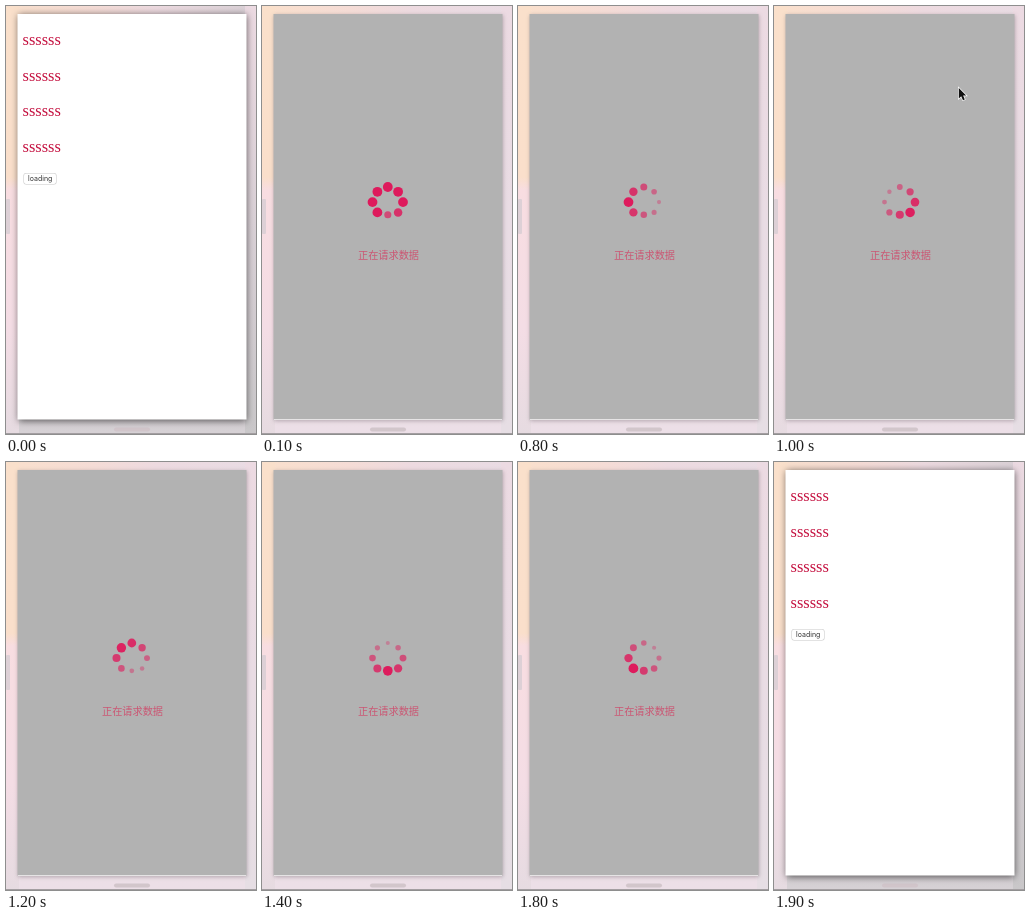
These frames come from a looping animation (250 by 428 pixels, 2000 ms). An HTML page with a canvas:

```html
<!DOCTYPE html>
<html lang="zh">
<head>
<meta charset="utf-8">
<style>
  html, body { margin: 0; width: 100%; height: 100%; overflow: hidden; }
  canvas { display: block; width: 250px; height: 428px; }
</style>
</head>
<body>
<canvas id="stage"></canvas>
<script>
const W = 250, H = 428, LOOP = 2000, STEP = 100;
const PANEL = [11.5, 8, 229, 405.5];
const canvas = document.getElementById('stage');
const ratio = window.devicePixelRatio || 1;
canvas.width = W * ratio;
canvas.height = H * ratio;
const ctx = canvas.getContext('2d');
ctx.scale(ratio, ratio);

// Dot offsets from the spinner centre, counter-clockwise from the bottom.
const DOTS = [[0, 13], [10.3, 10.6], [15.2, 0.3], [10.3, -10],
              [0, -14.8], [-10.4, -10], [-15.3, 0.3], [-10.4, 10.6]];

function box(fill, x, y, w, h, radius = 0) {
  ctx.fillStyle = fill;
  ctx.beginPath();
  ctx.roundRect(x, y, w, h, radius);
  ctx.fill();
}

function gradient(x1, y1, ...stops) {
  const g = ctx.createLinearGradient(0, 0, x1, y1);
  stops.forEach(([at, color]) => g.addColorStop(at, color));
  return g;
}

function text(string, font, color, x, y, align = 'left') {
  ctx.font = font;
  ctx.fillStyle = color;
  ctx.textAlign = align;
  ctx.fillText(string, x, y);
}

function drawBackdrop(loading) {
  const right = loading ? '#e9dce4' : '#d9d0d6';
  box(gradient(0, H, [0, '#f0dce2'], [1, loading ? '#ecdfe7' : '#d6d1d5']), 0, 0, W, H);
  box(gradient(W, 0, [0, '#fae0cc'], [0.35, '#f5dcd6'], [0.6, '#eddae0'], [1, right]), 0, 0, W, 10);
  box(gradient(0, H, [0, '#fae0cb'], [0.4, '#fadfcb'], [0.43, '#f8dde1'], [0.75, '#f4dde5'], [1, '#e6dbe1']), 0, 0, 13, H);
  box(gradient(0, H, [0, '#ecdae2'], [0.5, right], [1, loading ? '#e6dee4' : '#c9c7c9']), 239, 0, 11, H);
  box('#ddd0d6', 0, 193, 4, 35, 1);
  box('#d2c6cb', 108, 421.5, 36, 4, 2);
  box('#a39ea1', 0, 427, W, 1);
}

function drawPanel(loading) {
  ctx.save();
  ctx.shadowColor = loading ? 'rgba(90,80,85,.4)' : 'rgba(0,0,0,.6)';
  ctx.shadowBlur = (loading ? 4 : 7) * ratio;
  ctx.shadowOffsetY = ratio;
  box(loading ? '#b2b2b2' : '#fff', ...PANEL);
  ctx.restore();
  if (loading) box('#e6e4e5', 12, 413, 228, 1);
}

function drawPage() {
  for (let i = 0; i < 4; i++) {
    text('ssssss', '16.4px "Liberation Serif", serif', '#c4103f', 16.5, 39 + i * 35.5);
  }
  box('#c6c6c6', 17.5, 167, 33, 11.5, 2.5);
  box('#fff', 18, 167.4, 32, 10.5, 2);
  text('loading', '7px Inter, sans-serif', '#333', 34.2, 175.3, 'center');
}

function drawSpinner(step) {
  const seconds = 0.23 + 0.2125 * (step - 1);
  ctx.fillStyle = '#de1a5c';
  DOTS.forEach(([x, y], i) => {
    const phase = Math.max(0, seconds - 0.12 * i) % 1;
    const fade = 1 - Math.abs(1 - 2 * phase);
    ctx.globalAlpha = 1 - 0.7 * fade;
    ctx.beginPath();
    ctx.arc(125.8, 195.8, 4.9 * (1 - 0.6 * fade), 0, 2 * Math.PI);
    ctx.save();
    ctx.translate(x, y);
    ctx.beginPath();
    ctx.arc(125.8, 195.8, 4.9 * (1 - 0.6 * fade), 0, 2 * Math.PI);
    ctx.fill();
    ctx.restore();
  });
  ctx.globalAlpha = 1;
  text('正在请求数据', '300 10.2px "Noto Sans CJK SC", "Noto Sans CJK", sans-serif', '#cb5673', 126.5, 252.8, 'center');
}

function drawCursor(step) {
  const d = step - 10;
  if (Math.abs(d) > 1) return;
  ctx.save();
  ctx.translate(184.8 + 25 * d * d, 82 - 12 * d);
  const arrow = new Path2D('M0 0V10.4L2.4 8.2L4.2 12.2L6 11.4L4.3 7.5H7.4Z');
  ctx.strokeStyle = '#fff';
  ctx.lineWidth = 1.4;
  ctx.stroke(arrow);
  ctx.fillStyle = '#111';
  ctx.fill(arrow);
  ctx.restore();
}

function draw(time) {
  const step = Math.floor(time % LOOP / STEP);
  const loading = step >= 1 && step < 19;
  drawBackdrop(loading);
  drawPanel(loading);
  if (loading) {
    drawSpinner(step);
    drawCursor(step);
  } else {
    drawPage();
  }
}

const start = performance.now();
function tick() {
  draw(performance.now() - start);
  requestAnimationFrame(tick);
}
tick();
</script>
</body>
</html>
```
